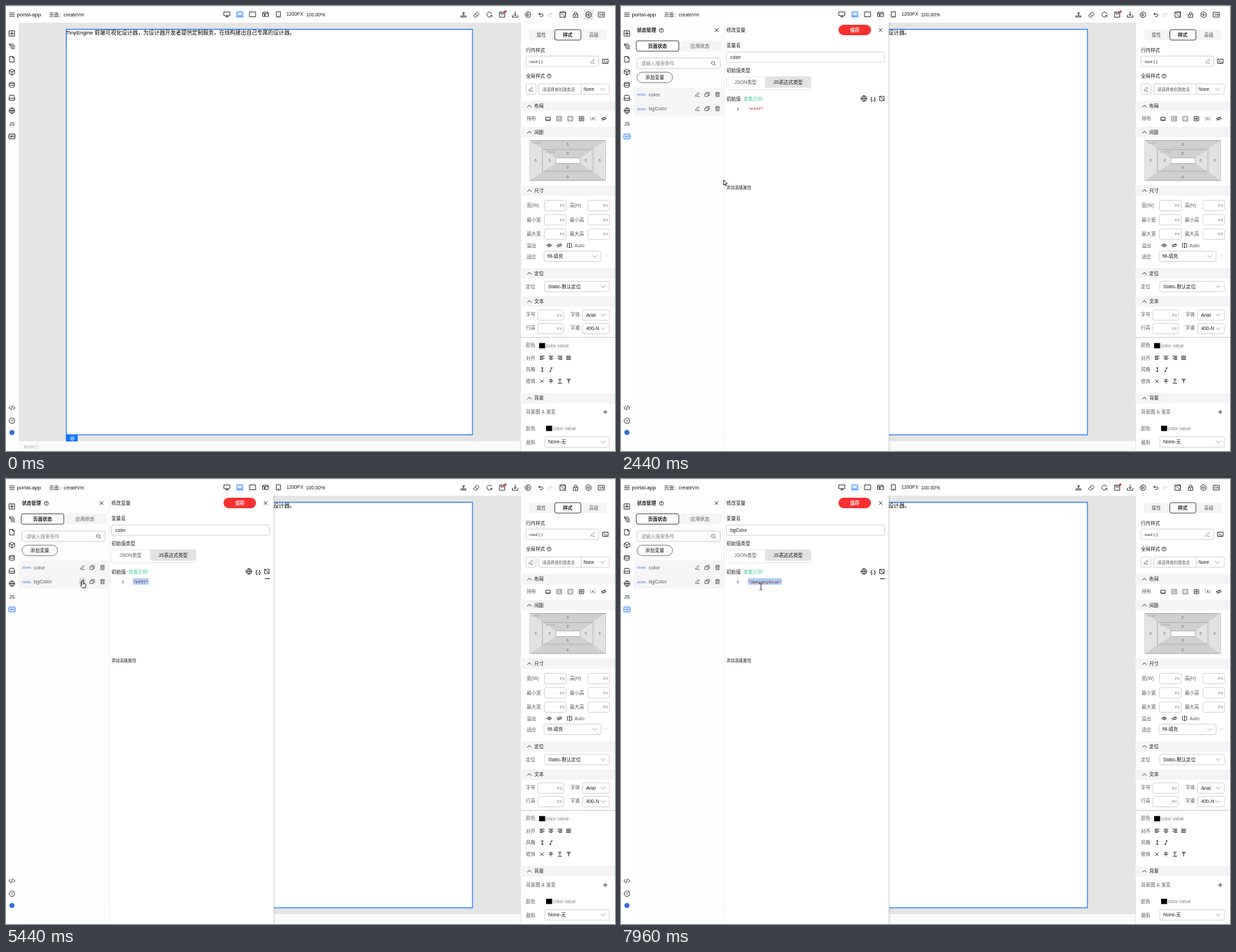
An HTML page for the animation above (7990 ms loop, 875x640 px).

```html
<!DOCTYPE html>
<html lang="zh-CN">
<head>
<meta charset="utf-8">
<title>State panel</title>
<style>
html, body { margin: 0; width: 100%; height: 100%; overflow: hidden; background: #fff; }
svg { display: block; }
text { font-family: "Liberation Sans", "Noto Sans CJK SC", "Noto Sans CJK", sans-serif; white-space: pre; }
.mono { font-family: "Liberation Mono", monospace; }
</style>
</head>
<body>
<svg id="stage" width="875" height="640" viewBox="0 0 875 640"></svg>
<script>
const LOOP = 7990, STEP = 30;
const BLUE = '#1476ff', INK = '#191919', GREY = '#595959', SOFT = '#808080', EDGE = '#c8c8c8', BAR = '#f4f4f4';

// Drawing helpers, all returning SVG markup
const text = (x, cy, s, size = 6.85, fill = INK, extra = '') =>
  `<text x="${x}" y="${cy + size * .36}" font-size="${size}" fill="${fill}" ${extra}>${s}</text>`;
const mid = (x, cy, s, size, fill, extra = '') => text(x, cy, s, size, fill, 'text-anchor="middle" ' + extra);
const rect = (x, y, w, h, fill = '#fff', stroke = 'none', r = 0, extra = '') =>
  `<rect x="${x}" y="${y}" width="${w}" height="${h}" rx="${r}" fill="${fill}" stroke="${stroke}" stroke-width=".8" ${extra}/>`;
const field = (x, cy, w, stroke = EDGE, r = 2.5) => rect(x, cy - 7.5, w, 15, '#fff', stroke, r);
const icon = (x, y, d, color = INK, w = .85) =>
  `<path transform="translate(${x} ${y})" d="${d}" fill="none" stroke="${color}" stroke-width="${w}" stroke-linejoin="round" stroke-linecap="round"/>`;
const group = (id, body, extra = '') => `<g id="${id}" ${extra}>${body}</g>`;
const ring = r => `M${-r} 0A${r} ${r} 0 1 1 ${r} 0A${r} ${r} 0 1 1 ${-r} 0`;
const box = (w, h) => `M${-w} ${-h}H${w}V${h}H${-w}Z`;

const D = {
  menu: 'M-3.5-2.5H3.5M-3.5 0H3.5M-3.5 2.5H3.5',
  down: 'M-3-1.5L0 1.5 3-1.5', up: 'M-2.8 1.4L0-1.4 2.8 1.4',
  cross: 'M-2.2-2.2L2.2 2.2M2.2-2.2L-2.2 2.2',
  plus: 'M-2.6 0H2.6M0-2.6V2.6',
  pencil: 'M-2.6 2.4L-2 .4 1.4-2.9 2.9-1.4-.6 1.9ZM0 3H3',
  copy: 'M-3-1.2H1.3V3H-3ZM-1.2-1.2V-3H3V1.2H1.3',
  bin: 'M-3-2.2H3M-1-2.2V-3.2H1V-2.2M-2.3-2.2V3.2H2.3V-2.2M-.8-.5V1.7M.8-.5V1.7',
  lens: 'M1.5 1.5L3.2 3.2M-3-.5A2.4 2.4 0 1 1 1.8-.5A2.4 2.4 0 1 1-3-.5',
  help: ring(3) + 'M-1-.8Q-.8-1.8 0-1.8 1.2-1.6 1-.6L0 .3M0 1.5V1.6',
  globe: ring(4) + 'M-4 0H4M0-4Q-3.4 0 0 4Q3.4 0 0-4',
  monitor: 'M-4.2-3.4H4.2V1.8H-4.2ZM0 1.8V3.6M-2 3.6H2',
  laptop: 'M-3.6-3.2H3.6V2H-3.6ZM-4.8 3.3H4.8',
  tablet: box(4.2, 3.4), phone: box(2.8, 3.8) + 'M-.5 2.5H.5',
  screens: 'M-4-1V-3H3.5V-1M-4-1H-1.5V3H-4ZM-.5-1H4.2V3H-.5Z',
  stamp: 'M-3.4 3.4H3.4V1.6H-3.4ZM0 1V-1.6M-1.2-2.2A1.2 1.2 0 1 1 1.2-2.2A1.2 1.2 0 1 1-1.2-2.2',
  eraser: 'M-4 1L1-4 4-1-1 4ZM-1.7-1.3L1.3 1.7',
  reload: 'M3.4 1.2A3.6 3.6 0 1 1 3.4-1.4M3.9 2.6L3.4.9 1.7 1.4',
  save: box(3.6, 3.6) + 'M-1.8-3.6V-1H1.8V-3.6',
  load: 'M0-4V1.4M-2-.6L0 1.4 2-.6M-4 1V3.6H4V1',
  play: ring(4) + 'M-1.1-1.8L1.9 0-1.1 1.8Z',
  undo: 'M-1.5-2.6L-3 -1-1.5.6M-3-1H1Q3-1 3 .9 3 2.6 1 2.6H-1',
  redo: 'M1.5-2.6L3-1 1.5.6M3-1H-1Q-3-1-3 .9-3 2.6-1 2.6H1',
  image: box(3.7, 3.7) + 'M-3.7-3.7L3.7 3.7M-1-3.7H3.7V1',
  lock: 'M-3-.6H3V3.8H-3ZM-1.8-.6V-2.2Q-1.6-3.9 0-3.9 1.6-3.9 1.8-2.2V-.6M0 1V2.2',
  gear: 'M0-4.2L3.7-2.1V2.1L0 4.2-3.7 2.1V-2.1Z' + ring(1.4),
  tree: 'M-4-3.2H2M-2-1H4M-2 1.2H4M-1 3.4H4M-3.2-3.2V-1H-2',
  page: 'M-3-4H1L3.2-1.8V4H-3ZM1-4V-1.8H3.2',
  cube: 'M0-4L3.8-2V2.2L0 4.2-3.8 2.2V-2ZM-3.8-2L0 0 3.8-2M0 0V4.2',
  data: 'M-3.5-2.7Q0-5.3 3.5-2.7V2.7Q0 5-3.5 2.7ZM-3.5-2.7Q0-.4 3.5-2.7M-3.5 0Q0 2.4 3.5 0',
  tray: 'M-2.6-3.6H2.6L4 .8V3.5H-4V.8ZM-4 .8H4',
  code: 'M-2-2.2L-4.4 0-2 2.2M2-2.2L4.4 0 2 2.2M.9-3L-.9 3',
  eye: 'M-3.6 0Q0-4 3.6 0Q0 4-3.6 0' + ring(1),
  hidden: 'M-3.4 0Q0-3.4 3.4 0Q0 3.4-3.4 0M-2.6 2.8L2.6-2.8',
  term: box(3.8, 3) + 'M-2.2-1.2L-.8 0-2.2 1.2M.3 1.4H2.2'
};
const put = (name, x, y, color, w) => icon(x, y, D[name], color, w);
const row = (cy, ...list) => list.map(([n, x, c]) => put(n, x, cy, c)).join('');

function topBar() {
  return rect(0, 0, 875, 24) + rect(0, 0, 875, 1, '#dcecec') +
    put('menu', 8.5, 12.5) + text(15.5, 12, 'portal-app', 7.75) + text(62, 12, '页面：createVm', 6.95) +
    rect(330.5, 6, 11.5, 12.5, '#e3efff', 'none', 2) +
    row(12, ['monitor', 317.5], ['laptop', 336, BLUE], ['tablet', 354.5], ['screens', 373], ['phone', 391.5]) +
    text(403, 12, '1200PX', 6.8) + text(431, 12, '100.00%', 6.95) +
    group('gearHover', rect(829.5, 5, 15, 15, '#e6e6e6', 'none', 2)) +
    row(12.5, ['stamp', 657.5], ['eraser', 676], ['reload', 694.5], ['save', 713], ['load', 731.5], ['play', 750],
      ['undo', 768.5], ['redo', 781.5, '#ccc'], ['image', 800], ['lock', 818.5], ['gear', 837], ['tablet', 855.5]) +
    mid(855.5, 12.5, 'CN', 4.2, INK, 'font-weight="700"') + '<circle cx="717.5" cy="8" r="1.7" fill="#f23030"/>';
}

function toolBar() {
  const names = ['', 'tree', 'page', 'cube', 'data', 'tray', 'globe'];
  return rect(0, 24, 18, 616) +
    icon(8.5, 39.5, box(3.8, 3.8) + D.plus) +
    names.map((n, i) => n && put(n, 8.5, 39.5 + 18.5 * i)).join('') +
    mid(8.5, 169, 'JS', 7) +
    group('varHover', rect(2, 181, 13, 13, '#e6e6e6', 'none', 2)) +
    group('varIcon', `<rect x="4" y="184.2" width="9" height="6.8" rx="1" fill="none" stroke="currentColor"/>` +
      mid(8.5, 187.6, 'VAR', 3.3, 'currentColor', 'font-weight="700"')) +
    put('code', 8.5, 578) + icon(8.5, 596.5, ring(4)) + mid(8.5, 596.6, '?', 6) +
    '<circle cx="8.5" cy="613.3" r="3.6" fill="#2f6fd8"/>';
}

function canvasArea() {
  return rect(18, 24, 721, 602, '#e5e5e5') + rect(18, 626, 721, 14, '#fafafa') +
    text(26, 633.3, 'BODY', 6.2, '#a0a0a0') + icon(45, 633, 'M-1.5-5L1.8 0-1.5 5', '#d0d0d0') +
    `<rect x="86.6" y="33.5" width="583.6" height="583.2" fill="#fff" stroke="${BLUE}" stroke-width="1.2"/>` +
    text(86.5, 38.4, 'TinyEngine 前端可视化设计器，为设计器开发者提供定制服务，在线构建出自己专属的设计器。', 7.79, '#000') +
    rect(86, 617, 17, 9.2, BLUE) + icon(95.5, 622, ring(2.6) + ring(.8), '#fff', .7);
}

const section = (cy, name) => rect(739, cy - 7.5, 136, 15, BAR) + put('up', 752, cy) + text(759, cy, name);
const label = (x, cy, s) => text(x, cy, s, 6.85, GREY);
const pxField = (x, cy, w) => field(x, cy, w) + text(x + w - 9.5, cy + .3, 'PX', 5.7, SOFT);
const select = (x, cy, w, s) => field(x, cy, w) + text(x + 5, cy, s) + put('down', x + w - 9, cy, SOFT, .7);
const swatch = (x, cy) => rect(x, cy - 3.8, 8.6, 7.6, '#000') + text(x + 9.5, cy, 'color value', 6.9, SOFT);

function spacing() {
  const zeros = [[807, 199], [807, 246], [761, 222.5], [853, 222.5], [807, 212.5], [807, 232.5], [781, 222.5], [833, 222.5]];
  const sides = (x, y, w, h, cx, cy, cw, ch) => rect(x, y, w, h, '#d0d0d0', '#999') +
    `<path d="M${x} ${y}L${cx} ${cy}V${cy + ch}L${x} ${y + h}ZM${x + w} ${y}L${cx + cw} ${cy}V${cy + ch}L${x + w} ${y + h}Z" fill="#e3e3e3"/>` +
    rect(cx, cy, cw, ch, '#fff', '#aaa');
  return sides(753, 193.5, 108.5, 57.5, 770.5, 205, 73.5, 34) + sides(772, 206.5, 70.5, 31, 790, 218.5, 35, 8) +
    text(756, 196.8, 'margin', 4, '#a0a0a0', 'font-style="italic"') +
    text(775, 210, 'padding', 4, '#a0a0a0', 'font-style="italic"') +
    zeros.map(([x, y]) => mid(x, y, '0', 5.4, GREY)).join('');
}

function sidePanel() {
  const lines = w => `M-3-2.4H3M${-w}-.8H${w}M-3 .8H3M${-w} 2.4H${w}`;
  const sizes = [[287, '宽(W)', '高(H)'], [307.5, '最小宽', '最小高'], [328, '最大宽', '最大高']];
  return rect(739, 24, 136, 616) + rect(739, 24, .8, 616, '#e0e0e0') +
    rect(751, 34, 112, 15, BAR, 'none', 2.5) + field(788.5, 41.5, 37.5, INK) +
    mid(769, 41.5, '属性', 6.85, GREY) + mid(807, 41.5, '样式', 6.85, INK, 'font-weight="700"') + mid(844.5, 41.5, '高级', 6.85, GREY) +
    text(747, 63.3, '行内样式') + field(747, 79.5, 104.5) + text(751, 79.5, ':root { }', 6.2) +
    put('pencil', 843, 79.5, SOFT, .7) + put('term', 861.3, 79.5) +
    text(747, 100.5, '全局样式') + put('help', 780.3, 100.7, INK, .7) +
    field(747, 119.5, 14.5) + put('pencil', 754.2, 119.5, GREY, .7) + field(765.5, 119.5, 101.5) + rect(826, 112, .7, 15, EDGE) +
    text(770.5, 120, '请选择或创建类名', 5.9, GREY) + text(830, 119.7, 'None', 6.3) + put('down', 857, 119.7, SOFT, .7) +
    section(144, '布局') + label(748, 162, '排布') +
    icon(779, 162, box(3, 2) + 'M-3 2.8H3') + icon(795, 162, box(3.2, 3.2) + 'M-1.2-1.6V1.6M1.2-1.6V1.6', GREY) +
    icon(811, 162, box(3.2, 3.2) + 'M-1.3-1.4V-1M1.3-1.4V-1M-1.3 1V1.4M1.3 1V1.4', GREY) +
    icon(827, 162, box(3, 3) + box(1, 1)) + icon(843, 162, 'M-3.2-3V3M3.2-3V3', SOFT, .6) + mid(843, 162, 'A', 5.5) + put('hidden', 859, 162) +
    section(181.5, '间距') + spacing() + section(265.5, '尺寸') +
    sizes.map(([y, a, b]) => label(748, y, a) + pxField(773.5, y, 31.5) + label(810, y, b) + pxField(836, y, 31.2)).join('') +
    label(748, 344.3, '溢出') + put('eye', 780.5, 344.3) + put('hidden', 795.2, 344.3) +
    icon(809.7, 344.3, 'M-3-3V3M3-3V3M0-3V3M-1-3H1M-1 3H1') + text(817, 344.3, 'Auto', 6.85, GREY) +
    label(748, 360.3, '适应') + select(773, 360, 82, 'fill-填充') + text(859, 359.5, '···', 7, SOFT) +
    section(384.5, '定位') + label(747, 404, '定位') + select(774, 403.5, 93, 'Static-默认定位') +
    section(425, '文本') + label(747, 443.5, '字号') + pxField(764, 444.5, 37) + label(811, 443.5, '字体') + select(828.5, 444.5, 38.5, 'Arial') +
    label(747, 463, '行高') + pxField(764, 464, 37) + label(811, 463, '字重') + select(828.5, 464, 38.5, '400-N') + rect(739, 476, 136, .8, '#c4c4c4') +
    label(747, 487.5, '颜色') + swatch(766, 488.5) + label(747, 506.3, '对齐') +
    icon(770.3, 506, 'M-3-2.4H3M-3-.8H1M-3 .8H3M-3 2.4H1') + icon(783, 506, lines(1.5)) +
    icon(795.8, 506, 'M-3-2.4H3M-1-.8H3M-3 .8H3M-1 2.4H3') + icon(808.3, 506, lines(3)) +
    label(747, 523, '风格') + icon(770.5, 523, 'M-1.2-2.6H1.2M0-2.6V2.6M-1.2 2.6H1.2') + icon(783, 523, 'M0-2.6H2M1-2.6L-1 2.6M-2 2.6H0') +
    label(747, 540, '修饰') + put('cross', 770, 539.7) + icon(783, 539.7, 'M-2-2.6H2M0-2.6V2.6M-3 0H3') +
    icon(795.8, 539.5, 'M-2-2.6H2M0-2.6V1.6M-2.6 3H2.6') + icon(808.5, 539.5, 'M-2.6-2.7H2.6M-1.6-1.4H1.6M0-1.4V2.7') +
    section(564, '背景') + label(747, 584, '背景图 &amp; 渐变') + put('plus', 861, 584) +
    label(747, 607.5, '颜色') + swatch(776, 607.5) + label(747, 627.3, '裁剪') + select(774, 627, 93, 'None-无');
}

function statePanel() {
  const item = (cy, name, id) => text(23, cy, 'state.', 5.9, '#4f80e8') + text(40, cy, name, 7.4, GREY) +
    group(id, rect(105, cy - 5, 9.5, 10, '#dcdcdc', 'none', 1.5)) +
    row(cy, ['pencil', 109.7, GREY], ['copy', 124, GREY], ['bin', 138.7, GREY]);
  return rect(18, 24, 130.5, 616, '#fdfdfd') + rect(148, 24, .8, 616, '#dedede') +
    text(23, 35, '状态管理', 6.8, INK, 'font-weight="700"') + put('help', 58, 35, INK, .7) + put('cross', 137.2, 34.7) +
    rect(22, 50, 123, 15, BAR, 'none', 2.5) + field(22, 57.5, 61, INK) +
    mid(52.5, 57.7, '页面状态', 6.85, INK, 'font-weight="700"') + mid(113.5, 57.7, '应用状态', 6.85, GREY) +
    field(23, 82.3, 119.5) + text(29, 82.5, '请输入搜索条件', 6.85, SOFT) + put('lens', 133, 82.5, GREY) +
    field(23, 102.7, 51, GREY, 7.5) + mid(48.5, 102.8, '添加变量') +
    rect(18, 117, 130, 40.5, '#f5f5f5') + item(127.2, 'color', 'hoverA') + item(147.5, 'bgColor', 'hoverB');
}

function editPanel() {
  const mono = (x, s, fill, id) => text(x, 147.3, s, 6.15, fill, `class="mono" id="${id}"`);
  return rect(385, 24, 2, 616, '#000', 'none', 0, 'opacity=".06"') + rect(148.5, 24, 236.5, 616) + rect(384.3, 24, .8, 616, '#d4d4d4') +
    text(151.5, 35, '修改变量') + rect(312.5, 27, 46.7, 15, '#f9302f', 'none', 7.5) +
    mid(336, 34.6, '保存', 6.85, '#fff', 'font-weight="700"') + put('cross', 373, 34.7) +
    text(151.5, 56.5, '变量名') + field(151.5, 73.6, 227) + text(157, 73.7, '', 6.85, INK, 'id="varName"') +
    text(151.5, 92.3, '初始值类型') + rect(151.5, 102, 121.5, 18.5, '#fff', '#e2e2e2', 1) + rect(207, 101.5, 66, 16, '#e2e2e2') +
    mid(179, 110, 'JSON类型', 6.85, GREY) + mid(240, 110, 'JS表达式类型') +
    text(151.5, 133.3, '初始值') + text(176, 133.3, '查看示例', 6.8, '#3fcf99') +
    put('globe', 349, 133) + mid(362.3, 133, '{.}', 7, INK, 'font-weight="700"') + icon(375, 133, box(3, 3) + 'M-3-3L3 3') +
    group('marked', rect(182.5, 142.6, 10, 9.4, '#a9cff8', 'none', 0, 'id="mark"') + rect(372.3, 142.7, 6.7, 1.3, '#444')) +
    mono(166, '1', '#0b216f', 'lineNo') + mono(182.7, '', '#a31515', 'code') +
    rect(182, 142.6, 1, 9.4, '#000', 'none', 0, 'id="caret"') +
    text(151.5, 260.5, '添加高级属性', 5.95);
}

const CURSORS = {
  arrow: '<path d="M0 0V7.6L1.8 6 3 8.6 4.1 8.1 3 5.6H5.4Z" fill="#fff" stroke="#000" stroke-width=".8"/>',
  hand: '<path d="M-1.1 1Q0-1 1.1 1V4L4 4.7Q5 5 5 6.5L4.1 10.6H0L-3 7Q-2.6 5.6-1.1 6.6Z" fill="#fff" stroke="#000" stroke-width=".8"/><path d="M1.1 4V6M2.7 4.5V6" stroke="#000" stroke-width=".5"/>',
  beam: '<path d="M-2-4.3H-.6L0-3.7.6-4.3H2M0-3.7V3.7M-2 4.3H-.6L0 3.7.6 4.3H2" fill="none" stroke="#222" stroke-width=".9"/>'
};

// Pointer stops: time, x, y, shape from then on (kept when omitted)
const PATH = [
  [130, 862, 110, 'arrow'], [190, 760, 160], [250, 644, 189], [310, 476, 223], [370, 330, 239], [430, 253, 246],
  [490, 205, 239], [550, 190, 226], [610, 153, 205], [670, 119, 200], [790, 13, 195], [1000, 13, 195],
  [1030, 13, 184, 'hand'], [1390, 13, 184, 'arrow'], [1780, 109.5, 131, 'hand'], [2140, 109.5, 131, 'arrow'],
  [2320, 106, 222], [2500, 168, 264], [2830, 177, 146], [3430, 177, 146, 'beam'], [3610, 198, 166], [3760, 198, 166],
  [4180, 196, 200], [4510, 176, 215, 'arrow'], [4570, 176, 215], [4780, 150, 218], [5140, 109, 150],
  [5290, 110, 146, 'hand'], [5650, 110, 146, 'arrow'], [5800, 125, 202], [6100, 170, 195, 'beam'], [6370, 205, 152],
  [6430, 205, 152], [6520, 179, 151], [6730, 179, 151], [6820, 207, 191], [7090, 205, 165], [7390, 187, 153],
  [7600, 187, 153], [7780, 209, 160], [7960, 201, 155]
];
for (let i = 1, kind = PATH[0][3]; i < PATH.length; i++) kind = PATH[i][3] ||= kind;

document.getElementById('stage').innerHTML =
  canvasArea() + topBar() + sidePanel() + toolBar() + group('panelA', statePanel()) + group('panelB', editPanel()) +
  group('pointer', Object.entries(CURSORS).map(([k, s]) => group(k, s)).join(''));

const el = id => document.getElementById(id);
const show = (id, on) => { el(id).style.display = on ? '' : 'none'; };
const within = (t, a, b) => t >= a && t < b;

function movePointer(t) {
  show('pointer', t >= PATH[0][0]);
  if (t < PATH[0][0]) return;
  const i = PATH.findLastIndex(p => p[0] <= t);
  const a = PATH[i], b = PATH[i + 1] || a;
  const k = b === a ? 0 : (t - a[0]) / (b[0] - a[0]);
  el('pointer').setAttribute('transform', `translate(${a[1] + (b[1] - a[1]) * k} ${a[2] + (b[2] - a[2]) * k})`);
  for (const name in CURSORS) show(name, name === a[3]);
}

function render(now) {
  const raw = now % LOOP;
  const t = raw < 10 ? 0 : Math.floor((raw - 10) / STEP) * STEP + 10;
  const second = t >= 5650;
  const code = second ? '"deepskyblue"' : '"#fff"';
  show('gearHover', t < 130);
  show('varHover', within(t, 1030, 1240));
  el('varIcon').style.color = t >= 1240 ? BLUE : INK;
  show('panelA', t >= 1240);
  show('panelB', t >= 1840);
  show('hoverA', within(t, 1780, 2140));
  show('hoverB', within(t, 5290, 5650));
  show('marked', t >= 3010);
  show('caret', within(t, 3010, 3430) || (t >= 3430 && !second && Math.floor((t - 3430) / 500) % 2 === 1));
  el('varName').textContent = second ? 'bgColor' : 'color';
  el('code').textContent = code;
  el('mark').setAttribute('width', code.length * 3.69 + .4);
  movePointer(t);
}

function tick() {
  render(performance.now());
  requestAnimationFrame(tick);
}
tick();
</script>
</body>
</html>
```
